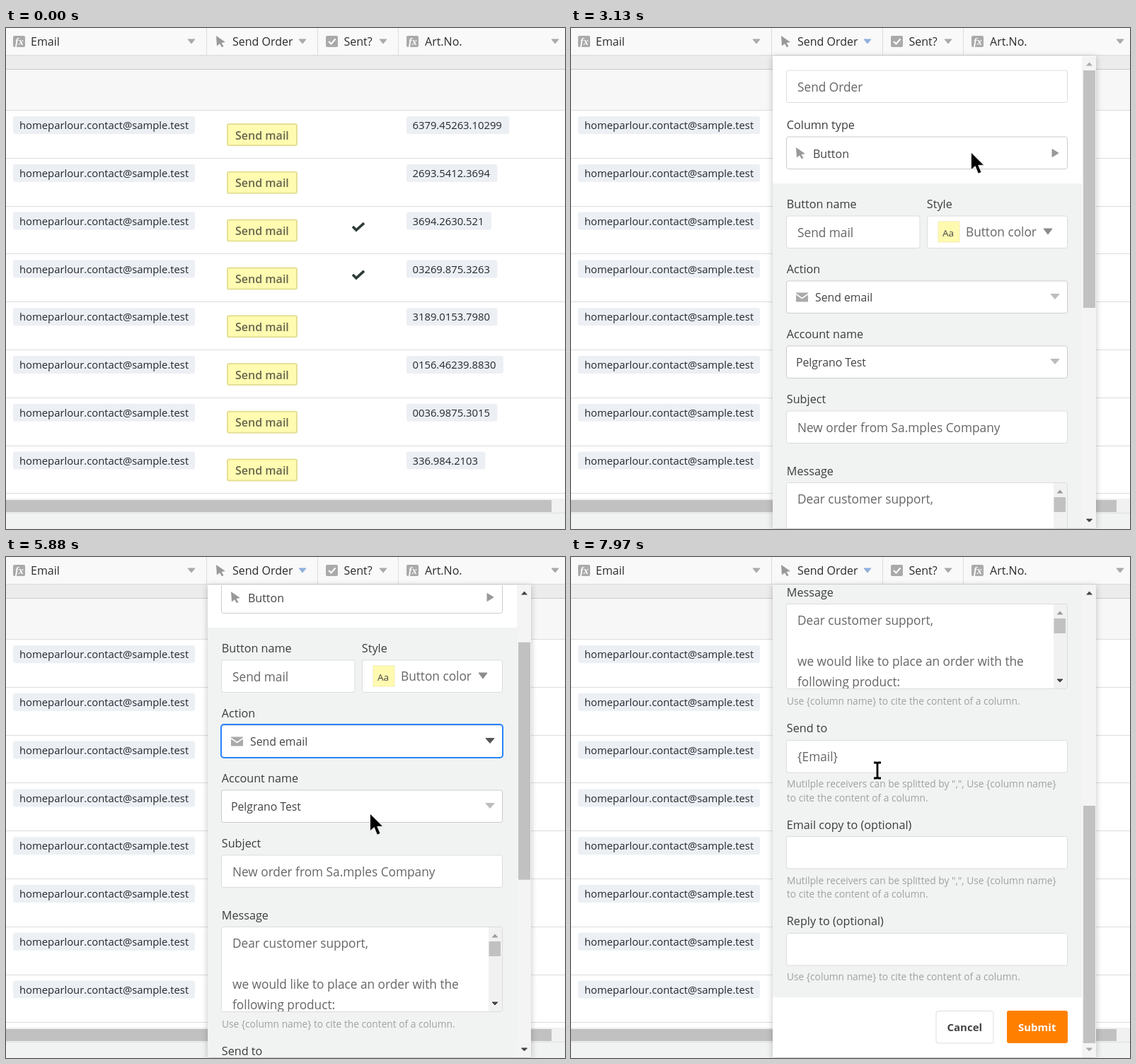
These frames come from a looping animation (790 by 709 pixels, 8000 ms). An HTML page:

```html
<!DOCTYPE html>
<html lang="en">
<head>
<meta charset="utf-8">
<title>Send mail button</title>
<style>
html, body { margin: 0; width: 100%; height: 100%; overflow: hidden; background: #fff; }
svg { display: block; width: 100vw; height: 100vh; font-family: "Open Sans", "Noto Sans", sans-serif; }
text { white-space: pre; }
.fx { font-family: "Liberation Serif", serif; font-style: italic; font-weight: bold; }
.shadow { filter: drop-shadow(0 2px 4px rgba(0, 0, 0, .24)); }
</style>
</head>
<body>
<svg id="stage" viewBox="0 0 790 709"></svg>
<script>
const LOOP = 8000, MAX_SCROLL = 577;
const MENU_TOP = 42.3, MENU_ROW = 33.45, OPTION_TOP = 345 - 46.6, OPTION_ROW = 46.6;
const $ = id => document.getElementById(id);

// Drawing helpers; text is centred vertically on y.
const rect = (x, y, w, h, fill, more = '') =>
  `<rect x="${x}" y="${y}" width="${w}" height="${h}" fill="${fill}" ${more}/>`;
const text = (x, y, size, fill, str, more = '') =>
  `<text x="${x - 1}" y="${y + size * .35}" font-size="${size}" fill="${fill}" ${more}>${str}</text>`;
const path = (d, more = '') => `<path d="${d}" ${more}/>`;
const at = (x, y, inner, more = '') => `<g transform="translate(${x} ${y})" ${more}>${inner}</g>`;
const down = (x, y, w, h, fill, more = '') =>
  path(`M${x - w / 2} ${y - h / 2}h${w}l${-w / 2} ${h}z`, `fill="${fill}" stroke="${fill}" stroke-linejoin="round" ${more}`);
const up = (x, y, fill, id) => path(`M${x - 4.5} ${y + 2.5}h9l-4.5-5z`, `fill="${fill}" id="${id}"`);
const hline = (y, color = '#ddd') => rect(0, y, 790, 1, color);
const line = (d, width = 2) => path(d, `fill="none" stroke="currentColor" stroke-width="${width}"`);
const solid = d => path(d, 'fill="currentColor"');

const icons = {
  pointer: solid('M-6-8L7 1 1.5 2 4.5 7 2 8.3-1 3.2-5 6.5z'),
  swap: solid('M-4-8h11v6h-4v-2h-7zM-8-2h8v9h-8zM2 1h6v6h-6z'),
  pen: solid('M-7 4L3-6l3 3L-4 7l-4 1zM4-7l1.5-1 2.5 2.5-1 1.5zM0 6h8v2h-9z'),
  lock: line('M-5-1v-3a3.5 3.5 0 0 1 7 0v3') + solid('M-8-1h12v2l-4 2 1 4h-9z') +
    '<circle cx="4" cy="4" r="3" fill="none" stroke="currentColor" stroke-width="2"/>',
  copy: solid('M-4-8h12v12h-12zM-8-4h3v9h9v3h-12z'),
  hide: line('M-7 1c3-7 11-7 14-1-3 7-11 7-14 1z') + solid('M-6 1c2-5 6-5 9-4l-6 8z') + line('M-5 7L6-7'),
  left: line('M8 0H-5', 2.4) + solid('M-8 0l6-4.5v9z'),
  right: line('M-8 0H5', 2.4) + solid('M8 0l-6-4.5v9z'),
  trash: solid('M-7-6h4l1-2h4l1 2h4v2h-14zM-6-3h12v11h-12z') + line('M-2-1v7M2-1v7', .7),
  fx: rect(-8, -8, 17, 16, '#aaa', 'rx="2"') + '<text x="-5" y="4.5" font-size="14" fill="#fff" class="fx">fx</text>',
  check: rect(-8, -8, 17, 16, '#aaa', 'rx="2"') +
    path('M-4 0l3.5 3.5 6-7', 'fill="none" stroke="#fff" stroke-width="2"'),
  mail: solid('M-8.5-5.5l8.5 6 8.5-6v-1h-17zM-8.5-3.5v10h17v-10l-8.5 6z'),
  script: rect(-8, -8, 16, 16, 'currentColor', 'rx="1.5"') +
    path('M-3-3l-3 3 3 3M3-3l3 3-3 3M1-4l-2 8', 'fill="none" stroke="#fff" stroke-width="1.2"'),
  modify: solid('M3-8h5v16h-5zM-8 4h9v4h-9z') + line('M-6 2c0-5 2-7 6-7M-3-8l3 3-3 3', 1.6),
  link: line('M3 3h-10v-9h10v3M-2-1h9v7h-9z')
};
const icon = (name, x, y, color, more = '') => at(x, y, icons[name], `color="${color}" fill="${color}" ${more}`);

function table() {
  const numbers = ['6379.45263.10299', '2693.5412.3694', '3694.2630.521', '03269.875.3263',
    '3189.0153.7980', '0156.46239.8830', '0036.9875.3015', '336.984.2103'];
  let out = rect(0, 0, 790, 709, '#fff') + rect(0, 0, 790, 38, '#f9f9f9') + rect(0, 39, 790, 19, '#ececec') +
    rect(0, 59, 790, 57, '#f7f7f7') + hline(38, '#dadada') + hline(58, '#cacaca');
  [283, 440, 554].forEach(x => out += rect(x, 0, 1, 38, '#ddd'));
  [['fx', 18, 36, 'Email', 262], ['pointer', 303, 321, 'Send Order', 419],
   ['check', 460, 478.5, 'Sent?', 533], ['fx', 574, 593, 'Art.No.', 776]].forEach(([name, ix, tx, label, cx], i) =>
    out += icon(name, ix, 19, '#999') + text(tx, 19, 16, '#2b2b2b', label) +
      down(cx, 19, 10, 6, '#aaa', i === 1 ? 'id="caret"' : ''));
  for (let i = 0; i <= 8; i++) out += hline(Math.round(116 + i * 67.8));
  numbers.forEach((no, i) => {
    const y = 138 + i * 67.8, digits = no.length - 2;
    out += rect(10, y - 13, 257, 25, '#eceff4', 'rx="3"') +
      text(20, y, 14.8, '#24292e', 'homeparlour.contact@sample.test') +
      rect(313, y - 2, 98, 30, '#fffbb0', 'rx="2" stroke="#e6df96" stroke-width="2"') +
      text(325, y + 14, 16, '#66654f', 'Send mail', 'font-weight="600"') +
      rect(566, y - 13, digits * 8.45 + 27, 25, '#eceff4', 'rx="3"') +
      text(575.5, y, 14.8, '#24292e', no);
    if (i === 2 || i === 3) out += path(`M490 ${y + 7.5}l5 5 11-10`,
      'fill="none" stroke="#2c3b35" stroke-width="3.6"');
  });
  return out + rect(0, 666, 790, 21, '#f1f1f1') + rect(0, 668, 771, 17, '#c1c1c1') +
    rect(0, 687, 790, 22, '#f1f3f3') + hline(686, '#dedede');
}

function menu() {
  const items = [['pointer', 'Edit button'], ['swap', 'Customize column type'], ['pen', 'Rename column'],
    ['lock', 'Edit column permissions'], ['copy', 'Duplicate column'], ['hide', 'Hide column'],
    ['left', 'Insert left'], ['right', 'Insert right'], ['trash', 'Delete column']];
  return rect(413, 31.5, 241, 321.5, '#fff', 'rx="3" stroke="#ccc" stroke-width=".8" class="shadow"') +
    rect(413, 0, 241, MENU_ROW, '#1e9dff', 'id="menuHover"') +
    items.map(([name, label], i) => {
      const y = 59 + i * MENU_ROW;
      return `<g class="item" color="#888">${at(436.5, y, icons[name])}${text(458, y, 16, 'inherit', label)}</g>`;
    }).join('');
}

const label = (y, str, x = 305) => text(x + .8, y, 16.2, '#3c3c3c', str);
const field = (y, x = 304.5, w = 397, stroke = '#dcdcdc', more = '') =>
  rect(x, y, w, 45.5, '#fff', `rx="3" stroke="${stroke}" ${more}`);
const value = (y, str, x = 321) => text(x, y, 17.25, '#666', str);
const hint = (y, str) => text(306, y, 13.76, '#a0a0a0', str);

function form() {
  const cite = 'Use {column name} to cite the content of a column.';
  const receivers = y => hint(y, 'Mutilple receivers can be splitted by ",", Use {column name}') +
    hint(y + 19.5, 'to cite the content of a column.');
  const select = (y, str, x, id) => field(y, 304.5, 397, '#ccc', `id="${id}"`) +
    text(x, y + 23.5, 15.8, '#444', str) + down(684, y + 22, 12, 7, '#bdbdbd', `id="${id}Caret"`);
  return rect(285, 0, 437, 220, '#fff') + rect(285, 220, 437, 980, '#f1f2f2') +
    field(60) + value(84, 'Send Order') + label(137, 'Column type') +
    field(154, 304.5, 397, '#ccc') + icon('pointer', 324, 177, '#999') + text(343, 178, 16, '#444', 'Button') +
    path('M680 171.5l9 5.5-9 5.5z', 'fill="#999" stroke="#999"') +
    label(249, 'Button name') + field(266, 304.5, 188.5) + value(290, 'Send mail') +
    label(249, 'Style', 503) + field(266, 503.5, 198) +
    rect(519, 274, 30, 29, '#fffab0', 'stroke="#eee6a0" stroke-width=".7"') +
    text(526, 290, 13.5, '#444', 'Aa') + value(289, 'Button color', 559) + down(674, 288, 12, 8, '#8c8c8c') +
    label(341, 'Action') + select(358, 'Send email', 346, 'action') + icon('mail', 326.5, 381, '#aaa') +
    rect(304, 357, 398, 47, 'none', 'rx="4" stroke="#2684ff" stroke-width="2" id="focus"') +
    label(433, 'Account name') + select(450, 'Pelgrano Test', 319, 'account') +
    label(525, 'Subject') + field(542) + value(566, 'New order from Sa.mples Company') +
    label(627, 'Message') + rect(304.5, 643.5, 397, 120, '#fff', 'rx="2" stroke="#dcdcdc"') +
    `<g clip-path="url(#note)">${value(667, 'Dear customer support,')}${value(725, 'we would like to place an order with the')}` +
    `${value(754, 'following product:')}</g>` +
    rect(682, 644, 19, 119, '#f1f1f1') + rect(682.5, 664, 16.5, 21, '#c1c1c1') +
    up(691, 656, '#999') + down(691, 752, 8, 4, '#444') + hint(781, cite) +
    label(819, 'Send to') + field(836.5) + value(859.5, '{Email}') + receivers(898.5) +
    label(956, 'Email copy to (optional)') + field(972.5) + receivers(1035) +
    label(1092, 'Reply to (optional)') + field(1109.5) + hint(1171.5, cite) +
    rect(285, 1200, 437, 90, '#fff') +
    rect(516, 1219.5, 81, 45.5, '#fff', 'rx="3" stroke="#ddd"') +
    text(532.5, 1243, 15, '#444', 'Cancel', 'font-weight="700"') +
    rect(616, 1219, 86, 46, '#ff8000', 'rx="3"') + text(633, 1243, 15, '#fff', 'Submit', 'font-weight="700"');
}

function panel() {
  return rect(285, 39, 457, 669, '#f3f3f3', 'class="shadow"') +
    `<g clip-path="url(#view)"><g id="form">${form()}</g></g>` +
    rect(722, 40, 20, 668, '#f4f4f4') + rect(724, 0, 17, 336, '#c1c1c1', 'id="thumb"') +
    up(732.5, 51, '#444', 'upArrow') + down(732.5, 697, 8, 4, '#444', 'id="downArrow"');
}

function options() {
  const rows = [['script', 'Run script'], ['mail', 'Send email'], ['copy', 'Copy row to another table'],
    ['modify', 'Modify row'], ['link', 'Open URL']];
  return rect(304, 293, 398, 243, '#fff', 'rx="4" stroke="#ccc" stroke-width=".8" class="shadow"') +
    rect(304, 0, 398, OPTION_ROW, '#f3f3f3', 'id="optionHover"') +
    rect(304, 345, 398, 46.5, '#2684ff') +
    rows.map(([name, str], i) => {
      const y = 322 + i * 46.5, on = i === 1;
      return icon(name, 327.5, y, on ? '#fff' : '#a5a9ad') + text(347, y, 17.1, on ? '#fff' : '#2b2b2b', str);
    }).join('');
}

const cursors = {
  arrow: path('M0-1v24.5l5.8-5 4.2 10.5 4.5-1.8-4.3-10h8z', 'fill="#000" stroke="#fff" stroke-width=".8"'),
  hand: path('M1 .5c-1.6 0-2 1-2 2v10l-2.5-2.5c-1-1-3 .2-2 1.8l5 7.5c1 1.8 2 3.5 4 3.5h4.5c2.5 0 4-2 4-4.5v-7' +
    'c0-2-2.6-2.2-2.8-.5 0-2-3-2.4-3.2-.5 0-2-3-2-3 0V2.5c0-1-.4-2-2-2z', 'fill="#fff" stroke="#000" stroke-width="1.3"'),
  beam: path('M-5-11h3.5l1.5 1 1.5-1h3.5M0-10v20M-5 11h3.5l1.5-1 1.5 1h3.5', 'fill="none" stroke="#000" stroke-width="2.8"')
};

$('stage').innerHTML = `<defs><clipPath id="view">${rect(285, 40, 437, 668, '#000')}</clipPath>
  <clipPath id="note">${rect(306, 644, 376, 119, '#000')}</clipPath></defs>` + table() +
  `<g id="menu">${menu()}</g><g id="panel">${panel()}</g><g id="options">${options()}</g><g id="cursor">` +
  Object.entries(cursors).map(([name, shape]) => `<g id="${name}">${shape}</g>`).join('') + '</g>';

// Keys: time, then values, eased between neighbours.
const cursorKeys = [[130, 640, 420], [840, 419, 17], [1360, 419, 17], [2050, 499, 89], [2790, 499, 89],
  [3550, 656, 297], [4240, 656, 297], [4520, 430, 262], [4590, 430, 262], [4870, 360, 402], [5010, 434, 376],
  [5220, 484, 370], [5750, 484, 370], [6230, 651, 338], [6580, 651, 338], [6850, 716, 321],
  [7180, 716, 321], [7830, 453, 321], [7970, 433, 302]];
const scrollKeys = [[3600, 0], [3800, 120], [6250, 120], [6430, 240], [6580, 240], [6850, 360],
  [7010, 360], [7130, 423], [7420, MAX_SCROLL]];
const shapeKeys = [[130, 'arrow'], [700, 'hand'], [2800, 'arrow'], [3400, 'hand'], [4600, 'arrow'],
  [6000, 'hand'], [6600, 'arrow'], [7400, 'beam']];

function sample(keys, t) {
  const next = keys.findIndex(k => k[0] > t);
  if (next === 0) return keys[0].slice(1);
  if (next < 0) return keys[keys.length - 1].slice(1);
  const a = keys[next - 1], b = keys[next];
  const p = (t - a[0]) / (b[0] - a[0]), e = p * p * (3 - 2 * p);
  return a.slice(1).map((v, i) => v + (b[i + 1] - v) * e);
}
const set = (id, name, v) => $(id).setAttribute(name, v);
const show = (id, on) => set(id, 'display', on ? 'inline' : 'none');
const paint = (id, color) => { set(id, 'fill', color); set(id, 'stroke', color); };
const items = [...document.querySelectorAll('.item')];

function draw(t) {
  const [x, y] = sample(cursorKeys, t), [scroll] = sample(scrollKeys, t);
  const shape = shapeKeys.filter(k => k[0] <= t).pop();
  Object.keys(cursors).forEach(name => show(name, shape && shape[1] === name));
  set('cursor', 'transform', `translate(${x} ${y})`);

  show('menu', t >= 970 && t < 2250);
  const hovered = Math.floor((y - MENU_TOP) / MENU_ROW);
  show('menuHover', hovered >= 0);
  set('menuHover', 'y', MENU_TOP + hovered * MENU_ROW);
  items.forEach((item, i) => {
    item.setAttribute('color', i === hovered ? '#fff' : '#888');
    item.setAttribute('fill', i === hovered ? '#fff' : '#2b2b2b');
  });
  paint('caret', t >= 970 ? '#8fb0dc' : '#aaa');

  show('panel', t >= 2250);
  set('form', 'transform', `translate(0 ${-scroll})`);
  set('thumb', 'y', 60 + scroll * 292 / MAX_SCROLL);
  set('upArrow', 'fill', scroll > 0 ? '#444' : '#aaa');
  paint('downArrow', scroll < MAX_SCROLL ? '#444' : '#aaa');

  const focused = t >= 4520;
  show('focus', focused);
  paint('actionCaret', focused ? '#555' : '#bdbdbd');
  set('account', 'stroke', t >= 6000 && t < 6600 ? '#b0b0b0' : '#ccc');

  show('options', focused && t < 5750);
  const option = Math.floor((y - OPTION_TOP) / OPTION_ROW);
  show('optionHover', option >= 0);
  set('optionHover', 'y', OPTION_TOP + option * OPTION_ROW);
}

function tick() {
  draw(performance.now() % LOOP);
  requestAnimationFrame(tick);
}
tick();
</script>
</body>
</html>
```
